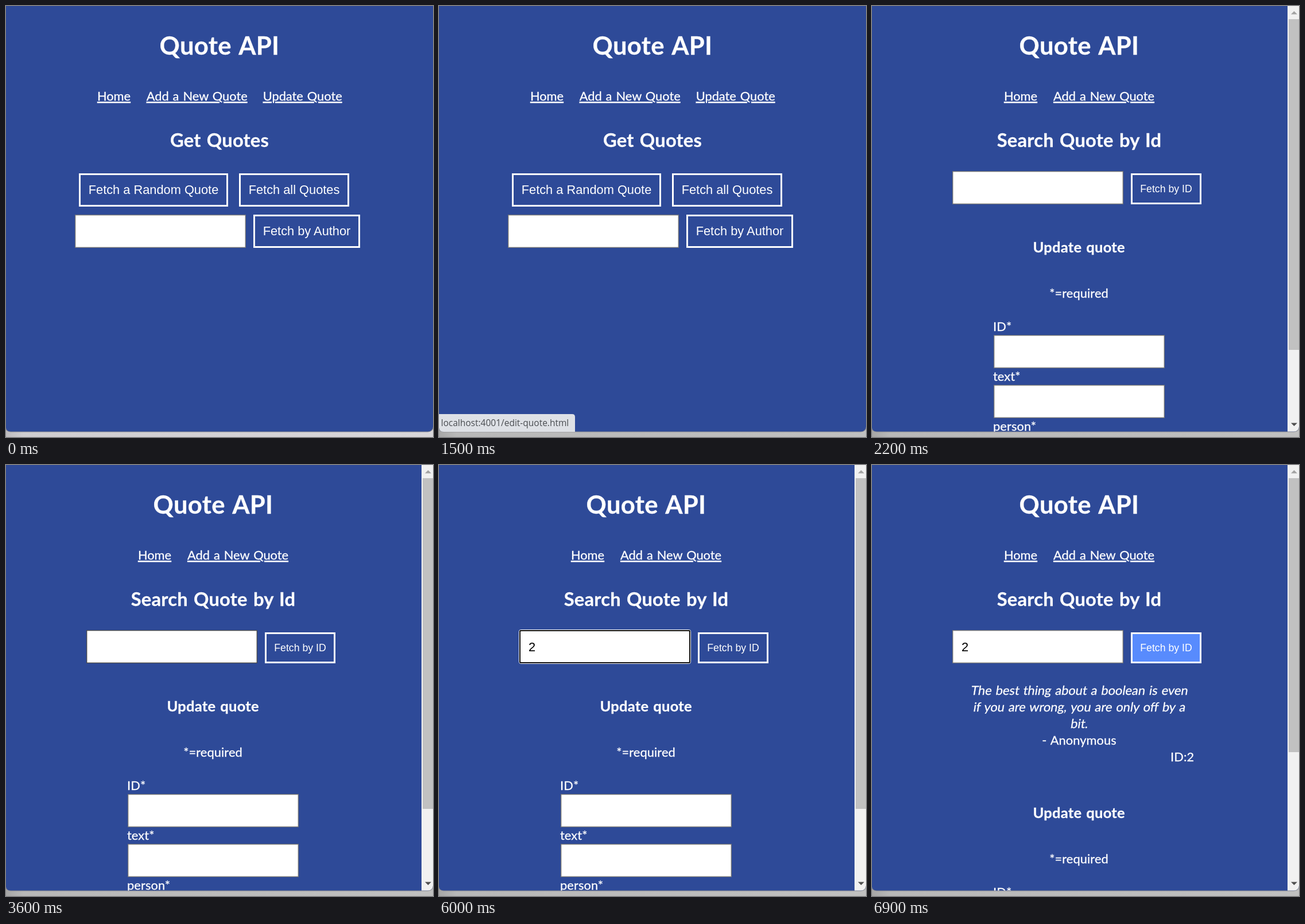
Animation of 744x752 px, one loop 8000 ms. Source, as an HTML page:

```html
<!DOCTYPE html>
<html lang="en">
<head>
<meta charset="utf-8">
<title>Quote API</title>
<style>
  html, body { margin: 0; width: 100%; height: 100%; overflow: hidden; background: #2e4a98; }
  svg { position: absolute; left: 0; top: 0; width: 744px; height: 752px; }

  text { fill: #fff; stroke: #fff; stroke-width: .3px; font: 21.8px Lato, sans-serif; word-spacing: .065em; letter-spacing: .1px; }
  .mid { text-anchor: middle; }
  .h1, .h2, .h3 { font-weight: 700; text-anchor: middle; }
  .h1 { font-size: 43.6px; letter-spacing: .35px; }
  .h2 { font-size: 32.7px; letter-spacing: .2px; }
  .h3 { font-size: 25.5px; letter-spacing: .25px; }
  .link { text-anchor: middle; letter-spacing: 0; text-decoration: underline; text-decoration-thickness: 1.4px; text-underline-offset: 2px; }
  .ui { font-family: "Liberation Sans", Arial, sans-serif; stroke: none; word-spacing: 0; letter-spacing: 0; }
  .small { font-size: 17.7px; }
  .dark { fill: #000; }
  .quote text { letter-spacing: 0; text-anchor: middle; }
  .url { font: 15.5px "Open Sans", sans-serif; fill: #4a4d51; stroke: none; word-spacing: 0; letter-spacing: 0; }

  .btn { fill: none; stroke: #fff; stroke-width: 3; }
  .field { fill: #fff; stroke: #767676; stroke-width: 1.36; }

  /* One 8 s clock, hard changes only: 1% = 80 ms */
  .anim { animation: 8s step-end infinite; }
  #home { animation-name: home; }
  #edit { animation-name: edit; }
  #strip { animation-name: strip; }
  #status { animation-name: status; }
  #search { animation-name: search; }
  #focus { animation-name: focus; }
  #caret1 { animation-name: caret1; }
  #caret2 { animation-name: caret2; }
  #typed { animation-name: typed; }
  #fetch { animation-name: fetch; }
  #result { animation-name: result; }
  #form { animation-name: form; }
  #thumb { animation-name: thumb; }

  @keyframes home { 0% { opacity: 1 } 23.75%, 100% { opacity: 0 } }
  @keyframes edit { 0% { opacity: 0 } 23.75%, 100% { opacity: 1 } }
  @keyframes strip { 0% { opacity: 0 } 18.75%, 100% { opacity: 1 } }
  @keyframes status {
    0% { opacity: 0 } 15% { opacity: .55 } 16.25% { opacity: 1 }
    25% { opacity: .67 } 26.25% { opacity: .33 } 27.5%, 100% { opacity: 0 }
  }
  @keyframes search { 0% { stroke: #767676 } 45% { stroke: #4a4a4a } 83.75%, 100% { stroke: #767676 } }
  @keyframes focus { 0% { opacity: 0 } 57.5% { opacity: 1 } 83.75%, 100% { opacity: 0 } }
  @keyframes caret1 { 0% { opacity: 0 } 57.5% { opacity: 1 } 63.75%, 100% { opacity: 0 } }
  @keyframes caret2 {
    0% { opacity: 0 } 68.75% { opacity: 1 } 75% { opacity: 0 }
    81.25% { opacity: 1 } 83.75%, 100% { opacity: 0 }
  }
  @keyframes typed { 0% { opacity: 0 } 68.75%, 100% { opacity: 1 } }
  @keyframes fetch { 0% { fill: #2e4a98 } 77.5% { fill: #446bcb } 78.75%, 100% { fill: #588bfd } }
  @keyframes result { 0% { opacity: 0 } 86.25%, 100% { opacity: 1 } }
  @keyframes form { 0% { transform: translateY(0) } 86.25%, 100% { transform: translateY(186px) } }
  @keyframes thumb { 0% { height: 577px } 86.25%, 100% { height: 478px } }
</style>
</head>
<body>
<svg viewBox="0 0 744 752">
  <defs>
    <path id="window" d="M0 0H744V734Q743 742.5 735 742.5H8Q1 742.5 0 736Z"/>
    <clipPath id="page"><use href="#window"/></clipPath>
    <linearGradient id="light">
      <stop offset="0" stop-color="#bdbbbe"/>
      <stop offset=".04" stop-color="#cfcdd0"/>
      <stop offset="1" stop-color="#d9d7da"/>
    </linearGradient>
    <linearGradient id="shade">
      <stop offset="0" stop-color="#a6a6a6"/>
      <stop offset=".04" stop-color="#b8b8b8"/>
      <stop offset="1" stop-color="#c0c0c0"/>
    </linearGradient>
  </defs>

  <rect y="730" width="744" height="22" fill="url(#light)"/>
  <rect id="strip" class="anim" y="730" width="744" height="22" fill="url(#shade)"/>
  <use href="#window" fill="#2e4a98" stroke="#8e8e92" stroke-width="2"/>

  <g clip-path="url(#page)">
    <rect width="744" height="743" fill="#2e4a98"/>

    <g id="home" class="anim">
      <text class="h1" x="372" y="85">Quote API</text>
      <text class="link" x="188" y="165">Home</text>
      <text class="link" x="332.7" y="165">Add a New Quote</text>
      <text class="link" x="516.7" y="165">Update Quote</text>
      <text class="h2" x="372" y="246">Get Quotes</text>
      <rect class="btn" x="128.5" y="293.5" width="257" height="55"/>
      <text class="ui mid" x="257" y="328">Fetch a Random Quote</text>
      <rect class="btn" x="407.5" y="293.5" width="189" height="55"/>
      <text class="ui mid" x="502" y="328">Fetch all Quotes</text>
      <rect class="field" x="120.7" y="364.7" width="296.6" height="56.6"/>
      <rect class="btn" x="432.5" y="365.5" width="183" height="55"/>
      <text class="ui mid" x="524" y="400">Fetch by Author</text>
    </g>

    <g id="edit" class="anim">
      <text class="h1" x="361" y="85">Quote API</text>
      <text class="link" x="259" y="165">Home</text>
      <text class="link" x="404" y="165">Add a New Quote</text>
      <text class="h2" x="361" y="246">Search Quote by Id</text>

      <rect id="search" class="field anim" x="140.7" y="288.7" width="296.6" height="56.6"/>
      <g id="focus" class="anim" fill="none">
        <rect x="139.5" y="287.5" width="299" height="59" rx="3" stroke="#fff"/>
        <rect x="141" y="289" width="296" height="56" rx="2" stroke="#101010" stroke-width="2"/>
      </g>
      <text id="typed" class="ui dark anim" x="156" y="325">2</text>
      <rect id="caret1" class="anim" x="156" y="305" width="2" height="24"/>
      <rect id="caret2" class="anim" x="168" y="305" width="2" height="24"/>
      <rect id="fetch" class="btn anim" x="452.5" y="293.5" width="120" height="51"/>
      <text class="ui small mid" x="512.5" y="324.5">Fetch by ID</text>

      <g id="result" class="anim">
        <g class="quote">
          <text transform="translate(360.5 401) skewX(-9)">The best thing about a boolean is even</text>
          <text transform="translate(360.5 430) skewX(-9)">if you are wrong, you are only off by a</text>
          <text transform="translate(360.5 459) skewX(-9)">bit.</text>
        </g>
        <text class="mid" x="361" y="488">- Anonymous</text>
        <text x="520" y="516.5" letter-spacing="0">ID:2</text>
      </g>

      <g id="form" class="anim">
        <text class="h3" x="360.7" y="430">Update quote</text>
        <text class="mid" x="360.5" y="508.5">*=required</text>
        <text x="211" y="566.5">ID*</text>
        <rect class="field" x="212.7" y="574.7" width="296.6" height="56.6"/>
        <text x="211" y="653.5">text*</text>
        <rect class="field" x="212.7" y="661.7" width="296.6" height="56.6"/>
        <text x="211" y="741">person*</text>
      </g>

      <rect x="724" width="20" height="743" fill="#f1f1f1"/>
      <rect id="thumb" class="anim" x="726" y="23" width="18" height="577" fill="#c1c1c1"/>
      <path d="M730 14.5L735.5 9L741 14.5Z" fill="#a3a3a3"/>
      <path d="M730 727.5H741L735.5 733Z" fill="#505050"/>
    </g>
  </g>

  <g id="status" class="anim">
    <path d="M0 712H232Q237 712 237 717V743H8Q1 743 0 736Z" fill="#dee1e6"/>
    <text class="url" x="3.5" y="733">localhost:4001/edit-quote.html</text>
  </g>
</svg>
</body>
</html>
```
